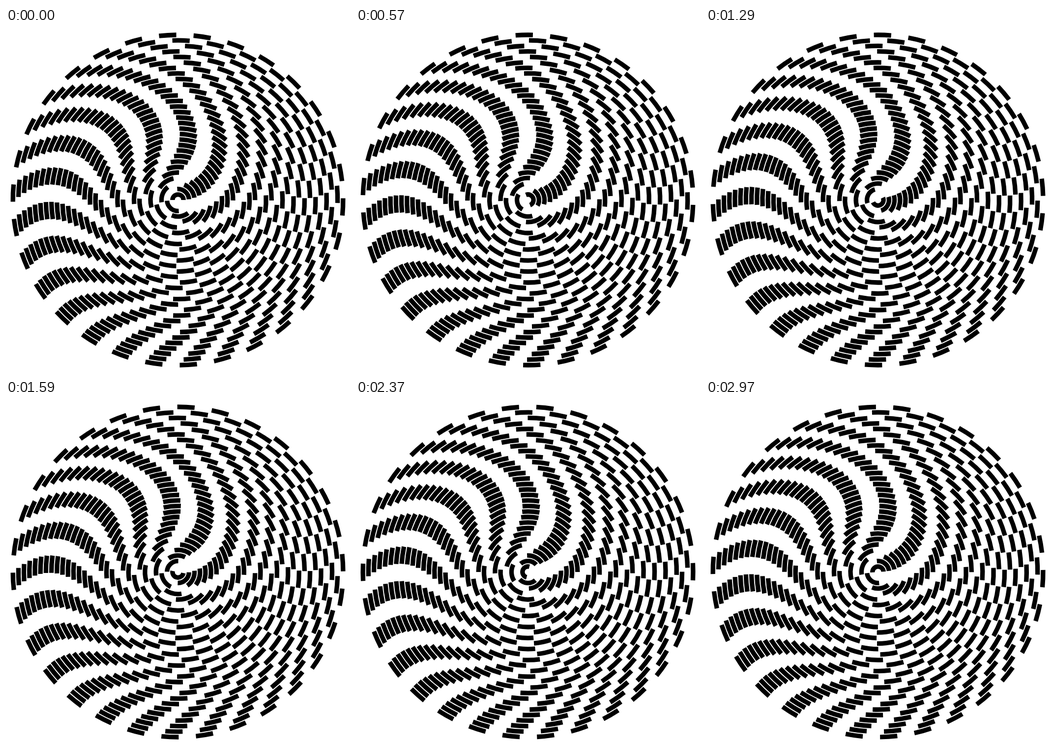
An HTML page with a canvas for the animation above (3 s loop, 700x700 px).

```html
<!DOCTYPE html>
<html lang="en">
<head>
<meta charset="utf-8">
<title>Dashed rings</title>
<style>
  html, body { margin: 0; width: 100%; height: 100%; overflow: hidden; background: #fff; }
  canvas { display: block; width: 700px; height: 700px; }
</style>
</head>
<body>
<canvas id="stage" width="700" height="700"></canvas>
<script>
const ctx = document.getElementById("stage").getContext("2d");
const SIZE = 700, LOOP = 3000, STEP = 30;
const RINGS = 30, GAP = 11.2, WIDTH = 9.3, TWIST = 2;
const TAU = Math.PI * 2;

// Ring n holds n dashes, so every dash has the same length and speed.
function drawRing(n, phase) {
  const slot = TAU / n;
  const start = -TWIST * (n - 1) / (RINGS - 1) + (phase - 0.5) * slot;
  ctx.beginPath();
  for (let i = 0; i < n; i++) {
    const a = start + i * slot, r = n * GAP;
    ctx.moveTo(SIZE / 2 + r * Math.cos(a), SIZE / 2 + r * Math.sin(a));
    ctx.arc(SIZE / 2, SIZE / 2, r, a, a + slot / 2);
  }
  ctx.stroke();
}

function draw(ms) {
  const phase = Math.floor((ms % LOOP) / STEP + 1e-6) * STEP / LOOP;
  ctx.fillStyle = "#fff";
  ctx.fillRect(0, 0, SIZE, SIZE);
  ctx.strokeStyle = "#000";
  ctx.lineWidth = WIDTH;
  for (let n = 1; n <= RINGS; n++) drawRing(n, phase);
}

const t0 = performance.now();
function tick() {
  draw(performance.now() - t0);
  requestAnimationFrame(tick);
}
tick();
</script>
</body>
</html>
```
